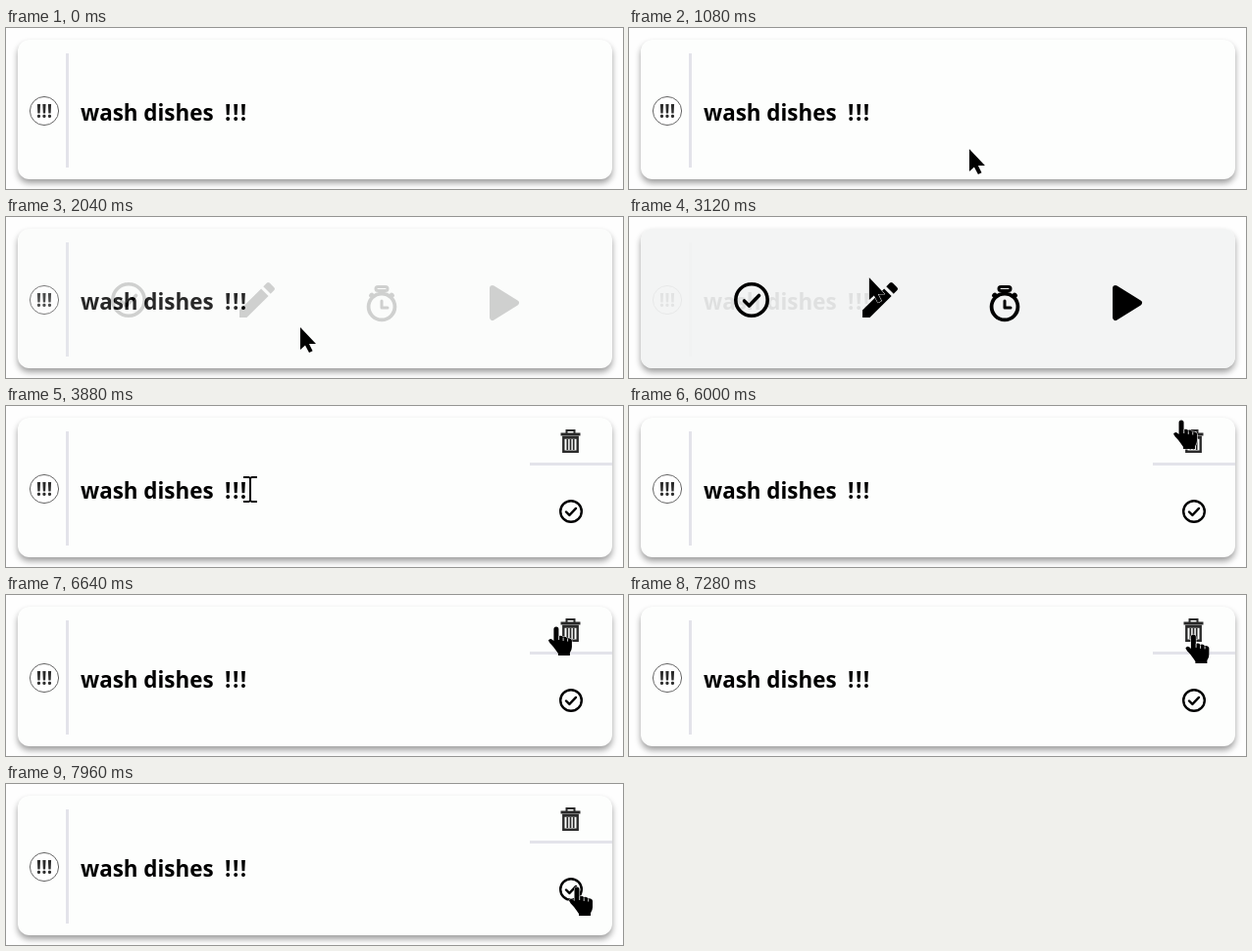
These frames come from a looping animation (629x165 px, 8000 ms). An HTML page:

```html
<!DOCTYPE html>
<html lang="en">
<head>
<meta charset="utf-8">
<title>Task card</title>
<style>
  html, body { margin: 0; width: 100%; height: 100%; overflow: hidden; background: #fefefe; }
  .card {
    position: absolute; left: 12px; top: 12px; width: 606px; height: 143px;
    border-radius: 12px; background: #fdfefd; box-shadow: 0 4px 6px rgba(0, 0, 0, .38);
  }
  svg { position: absolute; left: 0; top: 0; }
  text { font-family: "Open Sans", "Noto Sans", sans-serif; font-weight: 700; }
  .line { fill: none; stroke: #000; stroke-linecap: round; stroke-linejoin: round; }
  .rule { fill: #e3e3ea; }
</style>
</head>
<body>
<div class="card"></div>
<svg width="629" height="165" viewBox="0 0 629 165">
  <!-- task -->
  <circle cx="39" cy="85" r="14.6" fill="#fff" stroke="#666"/>
  <text x="39" y="91.5" font-size="19" text-anchor="middle" fill="#2c2c2c">!!!</text>
  <rect class="rule" x="61" y="26" width="3" height="117"/>
  <text x="76" y="95" font-size="22.4">wash dishes</text>
  <text x="223" y="95" font-size="22.4" letter-spacing="1.5">!!!</text>

  <!-- hover menu -->
  <g id="menu">
    <rect x="12" y="12" width="606" height="143" rx="12" fill="#f2f4f3" fill-opacity=".92"/>
    <g class="line" stroke-width="3.6">
      <circle cx="125" cy="85" r="16.2"/>
      <path d="M117.5 86l5 5 10-10.5"/>
    </g>
    <path transform="translate(232 61) scale(2)" d="M3 17.25V21h3.75L17.81 9.94l-3.75-3.75zM20.71 7.04a1 1 0 0 0 0-1.41l-2.34-2.34a1 1 0 0 0-1.41 0l-1.83 1.83 3.75 3.75z"/>
    <g class="line" stroke-width="3.8">
      <circle cx="383" cy="92" r="13.4"/>
      <path d="M383 86v7h6" stroke-width="3"/>
      <rect x="377" y="71.5" width="12" height="4" rx="2" stroke-width="3"/>
      <path d="M372 80.5l1-1M394 80.5l-1-1" stroke-width="4"/>
    </g>
    <path d="M496 73l24 15-24 15z" stroke="#000" stroke-width="6" stroke-linejoin="round"/>
  </g>

  <!-- edit buttons -->
  <g id="edit">
    <rect class="rule" x="534" y="58" width="84" height="3"/>
    <g fill="none" stroke="#2a2a2a">
      <path d="M565.5 29h20" stroke-width="3"/>
      <path d="M571.5 28v-3h8v3" stroke-width="2"/>
      <path d="M568.3 32v14.8h14.4V32z" stroke-width="2.4"/>
      <path d="M572.3 34v11M575.5 34v11M578.7 34v11" stroke-width="1.7"/>
      <path d="M568 32.5h15" stroke-width="2.4"/>
    </g>
    <g class="line" stroke-width="2.4">
      <circle cx="576" cy="108" r="10.8"/>
      <path d="M571 108.5l3.4 3.4 6.6-7"/>
    </g>
  </g>

  <!-- pointers, each with its hot spot at 0,0 -->
  <path id="arrow" d="M0 0V23L5 18.5 9 26l3.6-1.8L9 17h7z" stroke="#fff" paint-order="stroke"/>
  <path id="beam" class="line" stroke-width="2" style="stroke-linecap:butt" d="M-7-12h5.5l1.5 1 1.5-1H7M0-11v23M-7 13h5.5l1.5-1 1.5 1H7"/>
  <g id="hand">
    <path stroke="#fff" paint-order="stroke" d="M-2.5 2a2.5 2.5 0 0 1 5 0v7q3-1 4.5 1 3-1 4.5 1.2 4-.5 4.5 2.5v6.5q0 3-2 6V29H2v-2q-2-3-5-7-4-4-5-6.500 2-3.500 5.500.5z"/>
    <path d="M2.700 9v4M7.200 10.500v3.500M11.700 11.500v3" stroke="#fff" stroke-width=".8"/>
  </g>
</svg>
<script>
const LOOP = 8000;
const $ = id => document.getElementById(id);
const clamp = v => Math.min(1, Math.max(0, v));

// pointer path: time, x, y
const path = [
  [0, 412, 169], [690, 412, 169], [1200, 325, 111], [1480, 300, 113],
  [2660, 300, 113], [2820, 301, 110], [3120, 245, 62], [3240, 233, 58], [3440, 249, 85],
  [4500, 249, 85], [4840, 370, 112], [5320, 540, 62], [5360, 557, 45],
  [5560, 584, 22], [5800, 574, 3], [6160, 560, 25], [6400, 588, 16], [6640, 561, 33],
  [6840, 546, 40], [7040, 565, 30], [7400, 578, 50], [7840, 577, 97], [7960, 582, 106], [LOOP, 582, 106]
];

const still = (a, b) => !a || !b || (a[1] === b[1] && a[2] === b[2]);

// smooth curve through the points, at rest beside a pause
function slope(i, axis) {
  const a = path[i - 1], b = path[i], c = path[i + 1];
  return still(a, b) || still(b, c) ? 0 : (c[axis] - a[axis]) / (c[0] - a[0]);
}

function position(t, axis) {
  const i = path.findIndex((p, n) => n === path.length - 1 || t < path[n + 1][0]);
  const a = path[i], b = path[i + 1] || a, span = b[0] - a[0] || 1;
  const u = (t - a[0]) / span, v = 1 - u;
  return v * v * (1 + 2 * u) * a[axis] + u * u * (3 - 2 * u) * b[axis]
    + span * u * v * (v * slope(i, axis) - u * slope(i + 1, axis));
}

function draw(t) {
  const swap = clamp((t - 3700) / 170);
  $('menu').style.opacity = clamp((t - 1915) / 300) ** 2 * (1 - swap);
  $('edit').style.opacity = swap;

  const shape = t < 3720 ? 'arrow' : t < 4600 ? 'beam' : t < 5340 ? 'arrow' : 'hand';
  for (const id of ['arrow', 'beam', 'hand']) $(id).style.display = id === shape ? '' : 'none';
  $(shape).setAttribute('transform', `translate(${position(t, 1)} ${position(t, 2)})`);
}

const start = performance.now();
function tick(now) {
  draw(Math.max(0, now - start) % LOOP);
  requestAnimationFrame(tick);
}
draw(0);
requestAnimationFrame(tick);
</script>
</body>
</html>
```
